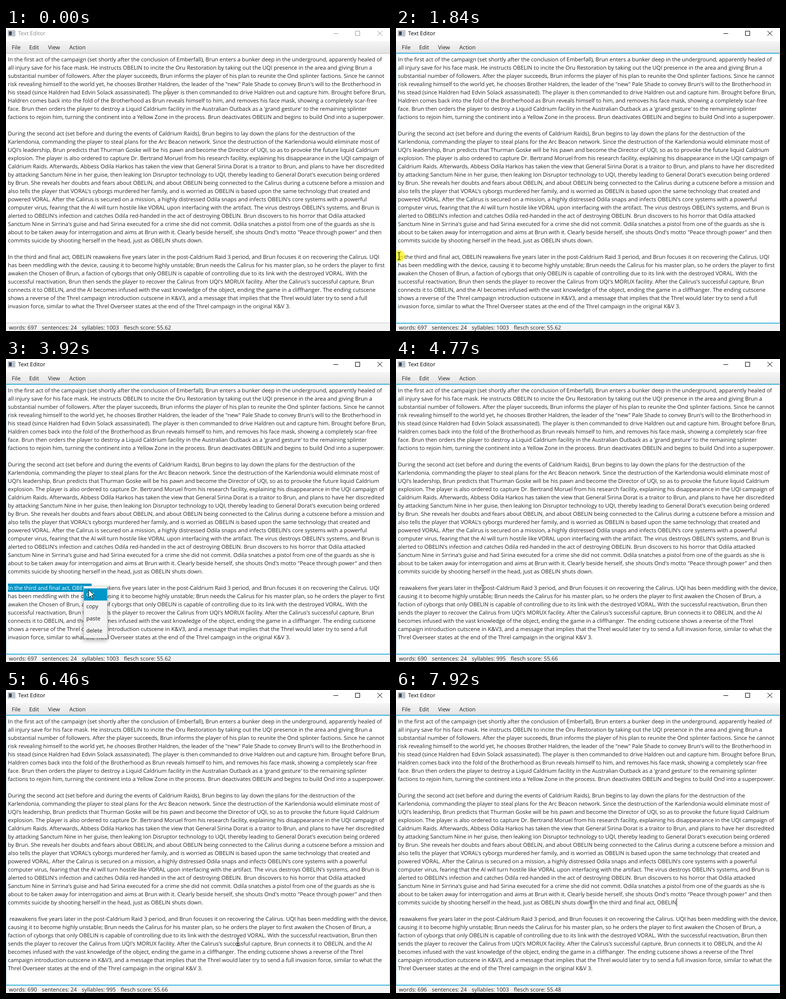
Recreate the animation shown at these times as an HTML page. Size 794 by 626 pixels, loop 8 s.

```html
<!DOCTYPE html>
<html lang="en">
<head>
<meta charset="utf-8">
<title>Text Editor</title>
<style>
html, body { margin: 0; width: 100%; height: 100%; overflow: hidden; background: #fff; }
body { position: relative; font: 11.4px/17px "Open Sans", "Noto Sans", sans-serif; color: #222;
  text-rendering: geometricPrecision; cursor: default; }
#stage { position: absolute; left: 0; top: 0; width: 794px; height: 626px; overflow: hidden; }
#stage div, #stage svg { position: absolute; white-space: pre; }
#chrome, #pointer { left: 0; top: 0; }
#title { left: 25px; top: 3px; }
#bar { left: 0; top: 27px; width: 794px; height: 25px; background: linear-gradient(#f6f6f6, #e3e3e3); }
#bar span { position: absolute; top: 5px; }
#area { left: 0; top: 52px; width: 794px; height: 558px; box-sizing: border-box; background: #fff;
  border: solid #bbb; border-width: 1px 0; }
.focus #area { border: 1px solid #039ed3; border-left-color: #9cd6ec; border-right-color: #9cd6ec;
  box-shadow: 0 0 0 1px rgba(3,158,211,.5); }
#status { left: 0; top: 611px; width: 788px; height: 15px; padding-left: 6px; background: #f4f4f4;
  display: flex; gap: 10px; }
#text { left: 4px; top: 56px; }
#text p { margin: 0; height: 17px; line-height: 19px; }
#text i { display: inline-block; width: 1px; height: 17px; margin-right: -1px; vertical-align: top; background: #a89078; }
.focus #text i { background: #333; }
mark { display: inline-block; height: 17px; background: #0096c9; color: #fff; }
#menu { left: 160px; top: 469px; width: 50px; height: 108px; box-sizing: border-box; padding: 4px 0;
  background: #f4f4f4; border: 1px solid #c8c8c8; border-top-color: #ddd; box-shadow: 0 4px 9px rgba(0,0,0,.35); }
#menu p { margin: 0; height: 25px; line-height: 25px; padding-left: 5px; }
#menu p.on { background: #0096c9; color: #fff; }
</style>
</head>
<body>
<div id="stage">
  <svg id="chrome" width="794" height="27" fill="none">
    <rect x="4.5" y="5.5" width="14" height="11" fill="#e8ebee" stroke="#8a929a"/>
    <rect x="6" y="7" width="6" height="8" fill="#34465c"/>
    <rect x="13" y="7" width="4" height="8" fill="#b4bcc4"/>
    <path id="buttons" d="M677 11.5h10M722.5 6.5h9v9h-9zM768 6l10 10M778 6l-10 10"/>
  </svg>
  <div id="title">Text Editor</div>
  <div id="bar"><span style="left:12px">File</span><span style="left:48px">Edit</span><span style="left:87px">View</span><span style="left:131px">Action</span></div>
  <div id="area"></div>
  <div id="text"></div>
  <div id="status"></div>
  <div id="menu"><p>cut</p><p>copy</p><p>paste</p><p>delete</p></div>
  <svg id="pointer" width="794" height="626">
    <g id="mouse">
      <circle id="halo" r="12" fill="#fe0" fill-opacity=".7"/>
      <path id="beam" d="M-3 -7.5h2.5l.5 .5l.5 -.5h2.5M0 -7v14M-3 7.5h2.5l.5 -.5l.5 .5h2.5" fill="none" stroke="#111"/>
      <path id="arrow" d="M0 0v16l3.7 -3.5l2.6 6l2.6 -1.1l-2.6 -5.9h5.2z" fill="#fff" stroke="#000"/>
    </g>
  </svg>
</div>
<script>
const intro = `In the first act of the campaign (set shortly after the conclusion of Emberfall), Brun enters a bunker deep in the underground, apparently healed of
all injury save for his face mask. He instructs OBELIN to incite the Oru Restoration by taking out the UQI presence in the area and giving Brun a
substantial number of followers. After the player succeeds, Brun informs the player of his plan to reunite the Ond splinter factions. Since he cannot
risk revealing himself to the world yet, he chooses Brother Haldren, the leader of the "new" Pale Shade to convey Brun's will to the Brotherhood in
his stead (since Haldren had Edvin Solack assassinated). The player is then commanded to drive Haldren out and capture him. Brought before Brun,
Haldren comes back into the fold of the Brotherhood as Brun reveals himself to him, and removes his face mask, showing a completely scar-free
face. Brun then orders the player to destroy a Liquid Caldrium facility in the Australian Outback as a 'grand gesture' to the remaining splinter
factions to rejoin him, turning the continent into a Yellow Zone in the process. Brun deactivates OBELIN and begins to build Ond into a superpower.

During the second act (set before and during the events of Caldrium Raids), Brun begins to lay down the plans for the destruction of the
Karlendonia, commanding the player to steal plans for the Arc Beacon network. Since the destruction of the Karlendonia would eliminate most of
UQI's leadership, Brun predicts that Thurman Goske will be his pawn and become the Director of UQI, so as to provoke the future liquid Caldrium
explosion. The player is also ordered to capture Dr. Bertrand Moruel from his research facility, explaining his disappearance in the UQI campaign of
Caldrium Raids. Afterwards, Abbess Odila Harkos has taken the view that General Sirina Dorat is a traitor to Brun, and plans to have her discredited
by attacking Sanctum Nine in her guise, then leaking Ion Disruptor technology to UQI, thereby leading to General Dorat's execution being ordered
by Brun. She reveals her doubts and fears about OBELIN, and about OBELIN being connected to the Calirus during a cutscene before a mission and
also tells the player that VORAL's cyborgs murdered her family, and is worried as OBELIN is based upon the same technology that created and
powered VORAL. After the Calirus is secured on a mission, a highly distressed Odila snaps and infects OBELIN's core systems with a powerful
computer virus, fearing that the AI will turn hostile like VORAL upon interfacing with the artifact. The virus destroys OBELIN's systems, and Brun is
alerted to OBELIN's infection and catches Odila red-handed in the act of destroying OBELIN. Brun discovers to his horror that Odila attacked
Sanctum Nine in Sirrina's guise and had Sirina executed for a crime she did not commit. Odila snatches a pistol from one of the guards as she is
about to be taken away for interrogation and aims at Brun with it. Clearly beside herself, she shouts Ond's motto "Peace through power" and then
commits suicide by shooting herself in the head, just as OBELIN shuts down.
`.split("\n");
const cutText = "In the third and final act, OBELIN";
const before = `${cutText} reawakens five years later in the post-Caldrium Raid 3 period, and Brun focuses it on recovering the Calirus. UQI
has been meddling with the device, causing it to become highly unstable; Brun needs the Calirus for his master plan, so he orders the player to first
awaken the Chosen of Brun, a faction of cyborgs that only OBELIN is capable of controlling due to its link with the destroyed VORAL. With the
successful reactivation, Brun then sends the player to recover the Calirus from UQI's MORUX facility. After the Calirus's successful capture, Brun
connects it to OBELIN, and the AI becomes infused with the vast knowledge of the object, ending the game in a cliffhanger. The ending cutscene
shows a reverse of the Threl campaign introduction cutscene in K&V3, and a message that implies that the Threl would later try to send a full
invasion force, similar to what the Threl Overseer states at the end of the Threl campaign in the original K&V 3.`.split("\n");
const after = ` reawakens five years later in the post-Caldrium Raid 3 period, and Brun focuses it on recovering the Calirus. UQI has been meddling with the device,
causing it to become highly unstable; Brun needs the Calirus for his master plan, so he orders the player to first awaken the Chosen of Brun, a
faction of cyborgs that only OBELIN is capable of controlling due to its link with the destroyed VORAL. With the successful reactivation, Brun then
sends the player to recover the Calirus from UQI's MORUX facility. After the Calirus's successful capture, Brun connects it to OBELIN, and the AI
becomes infused with the vast knowledge of the object, ending the game in a cliffhanger. The ending cutscene shows a reverse of the Threl
campaign introduction cutscene in K&V3, and a message that implies that the Threl would later try to send a full invasion force, similar to what the
Threl Overseer states at the end of the Threl campaign in the original K&V 3.`.split("\n");

// Ticks run at 13 per second; all times below are in ticks.
const RATE = 13 / 1000, LOOP = 8000;
const FOCUS = 24, MENU = 48, HOVER = 50, CUT = 62, CLICK = 76, PASTE = 87;
const presses = [[FOCUS, 40], [46, MENU], [60, CUT], [CLICK, 79]];
const path = [
  [1, 515, 602], [5, 260, 520], [9, 40, 461], [11, 22, 465], [15, 8, 467], [20, 8, 467], [21, 5, 471],
  [25, 6, 471], [33, 151, 470], [34, 160, 469], [37, 176, 466], [39, 176, 466], [40, 163, 470], [42, 175, 474],
  [45, 175, 474], [46, 160, 469], [49, 160, 469], [51, 171, 477], [53, 172, 478], [54, 176, 482], [56, 179, 475],
  [63, 179, 475], [64, 184, 484], [72, 444, 437], [73, 439, 441], [79, 439, 441], [86, 495, 553],
  [90, 474, 505], [97, 527, 443], [101, 403, 443], [104, 403, 443]
];
const $ = id => document.getElementById(id);
const show = (id, on) => $(id).style.display = on ? "" : "none";
const within = (k, [a, b]) => k >= a && k < b;
const LAST = 22, THIRD = 24;

function mouseAt(k) {
  const i = Math.max(1, path.findIndex(p => p[0] >= k));
  const [a, x, y] = path[i - 1], [b, u, v] = path[i];
  const f = Math.max(0, (k - a) / (b - a));
  return [Math.round(x + (u - x) * f), Math.round(y + (v - y) * f)];
}

function drawText(k, x) {
  const lines = [...intro, ...(k < CUT ? before : after)];
  const caret = (n, at) => lines[n] = lines[n].slice(0, at) + "<i></i>" + lines[n].slice(at);
  if (k >= PASTE) lines[LAST] += cutText;
  if (k < FOCUS) caret(4, lines[4].indexOf("player") + 2);
  else if (k < CUT) {
    const n = k < 37 ? Math.min(cutText.length, Math.round((x - 3) / 5)) : cutText.length;
    if (n > 0) lines[THIRD] = `<mark>${cutText.slice(0, n)}</mark>` + lines[THIRD].slice(n);
  } else if (k > 64 && (k - 64.5) % 12.8 < 6.4) {
    if (k < CLICK) caret(THIRD, 0);
    else caret(LAST, lines[LAST].length);
  }
  $("text").innerHTML = lines.map(s => `<p>${s}</p>`).join("");
}

function draw(k) {
  const [x, y] = mouseAt(k), focus = k >= FOCUS, menu = within(k, [MENU, CUT]);
  const [words, syllables, score] = k < CUT ? [697, 1003, 55.62] : k < PASTE ? [690, 995, 55.66] : [696, 1003, 55.48];
  drawText(k, x);
  $("stage").className = focus ? "focus" : "";
  $("title").style.color = focus ? "#000" : "#888";
  $("buttons").setAttribute("stroke", focus ? "#000" : "#999");
  $("status").innerHTML = [`words: ${words}`, "sentences: 24", `syllables: ${syllables}`, `flesch score: ${score}`]
    .map(s => `<span>${s}</span>`).join("");
  show("menu", menu);
  $("menu").firstElementChild.className = k >= HOVER ? "on" : "";
  show("mouse", k > 0);
  show("halo", presses.some(p => within(k, p)));
  show("arrow", menu);
  show("beam", !menu);
  $("mouse").setAttribute("transform", `translate(${x + (menu ? 0 : .5)} ${y})`);
}

let shown = -1;
function tick() {
  // Ticks fall on the 10 ms step before their exact time.
  const k = Math.min(103, Math.floor((performance.now() % LOOP + 9) * RATE));
  if (k !== shown) draw(shown = k);
  requestAnimationFrame(tick);
}
tick();
</script>
</body>
</html>
```
